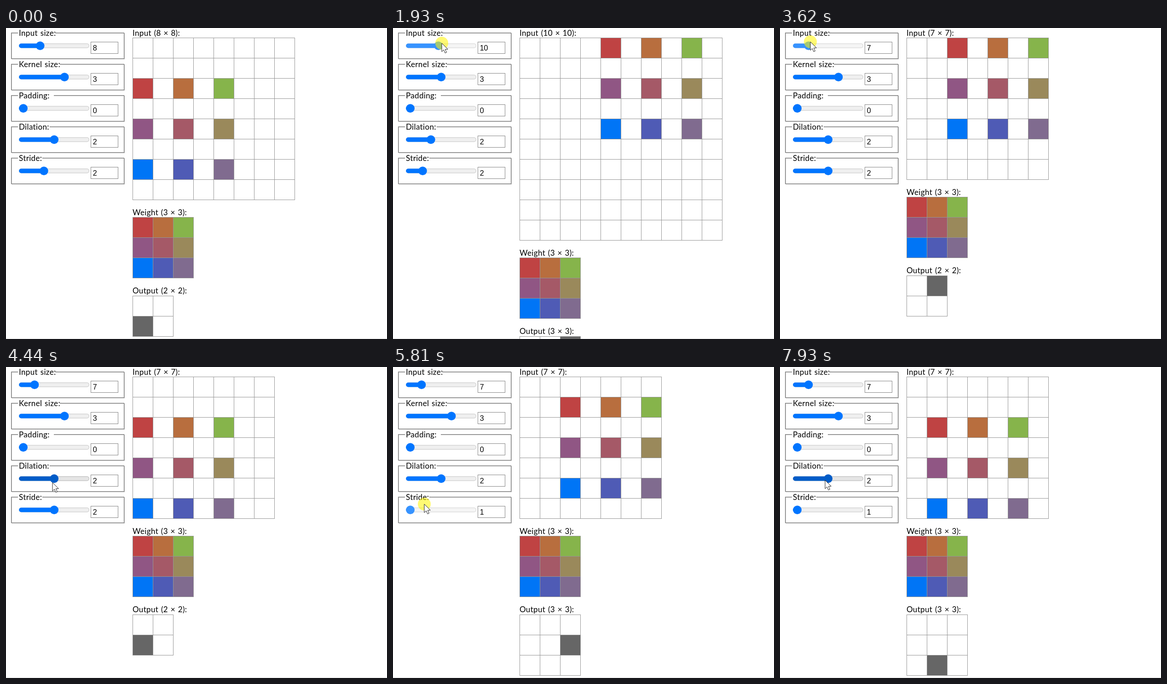
Animation, 828 px wide and 676 px high, one loop 8000 ms. Source, as an HTML page with a canvas:

```html
<!DOCTYPE html>
<html lang="en">
<head>
<meta charset="utf-8">
<title>Convolution explorer</title>
<style>
html, body { margin: 0; width: 100%; height: 100%; overflow: hidden; background: #fff; }
canvas { display: block; }
</style>
</head>
<body>
<canvas id="stage" width="828" height="676"></canvas>
<script>
const ctx = document.getElementById('stage').getContext('2d');
const LOOP = 8000, CELL = 44, LEFT = 275, KERNEL = 3, DILATION = 2;
const SPAN = (KERNEL - 1) * DILATION + 1;
const MIN_X = 37.6, TRAVEL = 134.2, ROW = 68;
const LABEL_FONT = '17px Lato, "Open Sans", sans-serif';
const FIELD_FONT = '16px "Liberation Sans", Arial, sans-serif';
const COLORS = ['#bf4343', '#b86e3e', '#86b44b', '#905684', '#a55967',
                '#9a895b', '#0075f6', '#4f5bb5', '#806b8f'];
const LABELS = [['Input size:', 107], ['Kernel size:', 117], ['Padding:', 104],
                ['Dilation:', 95], ['Stride:', 79]];
const STYLES = {
  rest:   { fill: '#0075ff', track: '#efefef', edge: '#c3c3c3' },
  hover:  { fill: '#005cc8', track: '#e5e5e5', edge: '#b0b0b0' },
  active: { fill: '#3793ff', track: '#f5f5f5', edge: '#d0d0d0' }
};
// The kernel moves one output cell at each tick.
const TICKS = [930, 1930, 2930, 3950, 4950, 5950, 6990];
const FIRST_STEP = 18;
// Pointer path: time, x, y
const PATH = [
  [260, 406, 301], [330, 240, 20], [390, 175, 28], [570, 175, 28],
  [800, 118, 34], [1200, 82, 37], [1470, 82, 37], [1660, 82, 36],
  [1720, 86, 36], [1790, 95, 35], [1860, 103, 34], [1930, 106, 33],
  [2420, 106, 33], [2530, 99, 32], [2660, 95, 31], [2820, 95, 31],
  [2860, 86, 31], [2930, 79, 31], [3090, 75, 31], [3620, 66, 30],
  [4210, 66, 30], [4440, 101, 251], [4700, 103, 294], [4990, 104, 304],
  [5130, 103, 303], [5400, 103, 303], [5810, 68, 298], [6160, 57, 298],
  [6720, 40, 297], [6990, 40, 297], [7060, 41, 298], [7500, 41, 298],
  [7930, 98, 246]
];
const DRAGS = [{ row: 0, from: 1470, to: 3950 }, { row: 4, from: 5400, to: 6990 }];

function pointerAt(t) {
  if (t < PATH[0][0]) return null;
  const next = PATH.findIndex(p => p[0] > t);
  if (next < 0) return { x: PATH.at(-1)[1], y: PATH.at(-1)[2] };
  const [t0, x0, y0] = PATH[next - 1], [t1, x1, y1] = PATH[next];
  const k = (t - t0) / (t1 - t0);
  return { x: x0 + (x1 - x0) * k, y: y0 + (y1 - y0) * k };
}

function inputSize(t) {
  if (t < DRAGS[0].from) return 8;
  const { x } = pointerAt(Math.min(t, DRAGS[0].to));
  return 5 + Math.round((x - 8 - MIN_X) / (TRAVEL / 11));
}

function strideAt(t) {
  if (t < DRAGS[1].from) return 2;
  const { x } = pointerAt(Math.min(t, DRAGS[1].to));
  return 1 + Math.round((x - MIN_X) / (TRAVEL / 2));
}

function text(str, x, y, font, spacing = 0) {
  ctx.font = font;
  ctx.letterSpacing = spacing + 'px';
  ctx.wordSpacing = spacing ? '1px' : '0px';
  ctx.fillStyle = '#000';
  ctx.fillText(str, x, y);
}

function pill(x, y, w, h) {
  ctx.beginPath();
  ctx.roundRect(x, y, w, h, h / 2);
}

function disc(x, y, r, color) {
  ctx.fillStyle = color;
  ctx.beginPath();
  ctx.arc(x, y, r, 0, Math.PI * 2);
  ctx.fill();
}

function control(row, value, ratio, state) {
  const top = 10 + row * ROW, mid = 38.6 + row * ROW;
  const [label, gapEnd] = LABELS[row], style = STYLES[state];

  ctx.lineWidth = 1;
  ctx.strokeStyle = '#b4b4b4';
  ctx.strokeRect(12.5, top + 1.5, 245, 56);
  ctx.strokeStyle = '#7c7c7c';
  ctx.strokeRect(11.5, top + 0.5, 245, 56);
  ctx.fillStyle = '#fff';
  ctx.fillRect(26, top - 1, gapEnd - 26, 4);
  text(label, 28, top + 6.7, LABEL_FONT, 0.35);

  const x = MIN_X + TRAVEL * ratio;
  pill(28.6, mid - 4.5, 152, 9);
  ctx.fillStyle = style.track;
  ctx.fill();
  ctx.strokeStyle = style.edge;
  ctx.stroke();
  pill(28.2, mid - 4.9, x - 28.2, 9.8);
  ctx.fillStyle = style.fill;
  ctx.fill();
  disc(x, mid, 9.4, style.fill);

  ctx.strokeStyle = '#858585';
  ctx.strokeRect(184.5, top + 20.5, 59, 25);
  text(value, 188.7, top + 38.5, FIELD_FONT);
}

function grid(title, n, y, baseline, cells) {
  text(`${title} (${n} × ${n}):`, LEFT, baseline, LABEL_FONT, 0.35);
  const size = n * CELL + 1;
  ctx.fillStyle = '#fff';
  ctx.fillRect(LEFT, y, size, size);
  for (const [r, c, color] of cells) {
    ctx.fillStyle = color;
    ctx.fillRect(LEFT + c * CELL, y + r * CELL, CELL, CELL);
  }
  ctx.fillStyle = '#969696';
  for (let i = 0; i <= n; i++) {
    ctx.fillRect(LEFT + i * CELL, y, 1, size);
    ctx.fillRect(LEFT, y + i * CELL, size, 1);
  }
}

function kernelCells(row, col, gap) {
  return COLORS.map((color, i) =>
    [row + Math.floor(i / KERNEL) * gap, col + (i % KERNEL) * gap, color]);
}

function pointer({ x, y }, pressed) {
  if (pressed) disc(x, y, 14, 'rgba(255, 244, 0, 0.55)');
  ctx.save();
  ctx.translate(x, y);
  ctx.beginPath();
  [[0, 0], [0, 18.5], [4.2, 14.6], [7.2, 21.4], [10.4, 20], [7.4, 13.4], [13.2, 13.2]]
    .forEach(([px, py]) => ctx.lineTo(px, py));
  ctx.closePath();
  ctx.fillStyle = '#fff';
  ctx.fill();
  ctx.strokeStyle = '#222';
  ctx.lineWidth = 1;
  ctx.stroke();
  ctx.restore();
}

function draw(t) {
  const n = inputSize(t), stride = strideAt(t), tip = pointerAt(t);
  const drag = DRAGS.find(d => t >= d.from && t < d.to);
  const out = Math.floor((n - SPAN) / stride) + 1;
  const step = (FIRST_STEP + TICKS.filter(v => v <= t).length) % (out * out);
  const row = Math.floor(step / out), col = step % out;

  ctx.fillStyle = '#fff';
  ctx.fillRect(0, 0, 828, 676);
  ctx.fillStyle = '#dedede';
  ctx.fillRect(0, 675, 828, 1);

  // Upper limits follow from the other settings.
  const maxKernel = Math.floor((n - 1) / DILATION) + 1;
  const maxDilation = Math.floor((n - 1) / (KERNEL - 1));
  const settings = [
    [n, (n - 5) / 11],
    [KERNEL, (KERNEL - 1) / (maxKernel - 1)],
    [0, 0],
    [DILATION, (DILATION - 1) / (maxDilation - 1)],
    [stride, (stride - 1) / (n - SPAN)]
  ];
  settings.forEach(([value, ratio], i) => {
    const over = tip && tip.x > 28 && tip.x < 181 &&
      Math.abs(tip.y - 38.6 - i * ROW) < 9.5;
    const state = drag ? (drag.row === i ? 'active' : 'rest') : over ? 'hover' : 'rest';
    control(i, value, ratio, state);
  });

  const bottom = 21 + n * CELL;
  grid('Input', n, 21, 16.7, kernelCells(row * stride, col * stride, DILATION));
  grid('Weight', KERNEL, bottom + 38, bottom + 34, kernelCells(0, 0, 1));
  grid('Output', out, bottom + 209, bottom + 204.3, [[row, col, '#666']]);

  if (tip) pointer(tip, Boolean(drag));
}

function loop() {
  draw(performance.now() % LOOP);
  requestAnimationFrame(loop);
}
loop();
</script>
</body>
</html>
```
